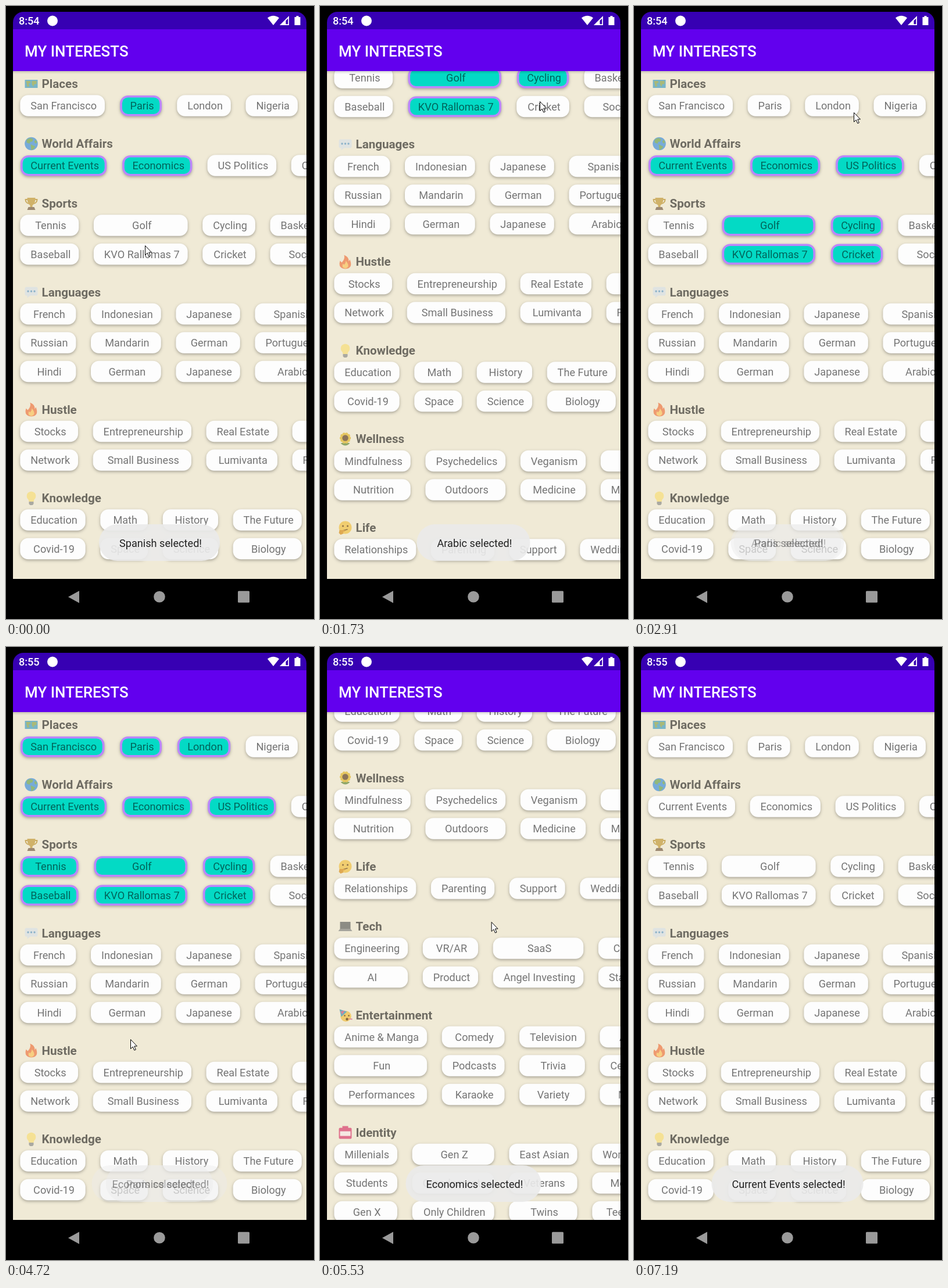
An HTML page with a canvas for the animation above (7590 ms loop, 530x1055 px).

```html
<!DOCTYPE html>
<html lang="en">
<head>
<meta charset="utf-8">
<title>My interests</title>
<style>
  html, body { margin: 0; width: 100%; height: 100%; overflow: hidden; background: #000; }
  canvas { display: block; width: 530px; height: 1055px; }
</style>
</head>
<body>
<canvas></canvas>
<script>
const LOOP = 7590, W = 530, H = 1055;
const canvas = document.querySelector('canvas'), g = canvas.getContext('2d');
const dpr = window.devicePixelRatio || 1;
canvas.width = W * dpr;
canvas.height = H * dpr;
g.scale(dpr, dpr);

const CHIP_FONT = '400 18.15px Roboto, sans-serif';
const clamp = v => Math.max(0, Math.min(1, v));
const smooth = p => p * p * (3 - 2 * p);
const dot = (x, y, r) => `M${x - r} ${y}a${r} ${r} 0 1 0 ${2 * r} 0a${r} ${r} 0 1 0 ${-2 * r} 0z`;
const dots = (...points) => points.map(([x, y, r]) => dot(x, y, r)).join('');
const petals = dots(...Array.from({ length: 10 }, (_, i) =>
  [7 * Math.cos(i * Math.PI / 5), 7 * Math.sin(i * Math.PI / 5) - 2, 2.6]));

// Icons are layers of [colour, path] around the origin.
const icons = {
  map: [['#79b5c8', 'M-11-7H11V7H-11z'], ['#a9b978', 'M-9-5h7l1 3-4 2 2 4-4 1-1-6zM1-5h8v5l-4 1-1 4-3-4z']],
  globe: [['#77abd8', dot(0, 0, 11.3)], ['#93b878', 'M-8-7l6-3 5 2-1 4-4 1-1 3-5-2zM-1 1l8 4-4 5-3 1zM7-7l3 4-2 3-3-3z']],
  trophy: [['#c9aa5e', 'M-11-8H11Q11 0 4 1H-4Q-11 0-11-8z'], ['#f0ead6', 'M-9-6H9Q8-1 4-1H-4Q-8-1-9-6z'],
    ['#d0b269', 'M-7-10H7Q7 1 2 3V6H-2V3Q-7 1-7-10z'], ['#9c8972', 'M-5 6H5l2 5H-7z']],
  speech: [['#dfe3e2', 'M-8-9H8q3 0 3 3V3q0 3-3 3H-2L-7 10V6h-1q-3 0-3-3V-6q0-3 3-3z'],
    ['#8cb2c9', dots([-5.5, -1.5, 1.7], [0, -1.5, 1.7], [5.5, -1.5, 1.7])]],
  fire: [['#ee9a70', 'M-2-12Q7-8 6-1L8-4Q14 11 0 12-13 11-9-2L-6 1Q0-5-2-12z'],
    ['#f7cf82', 'M1-2Q6 4 5 8 2 12-1 11-7 9-4 3L-2 5Q1 2 1-2z']],
  bulb: [['#f5e194', 'M-4 6Q-4 3-7 0-9-5-6-9 0-14 6-9 9-5 7 0 4 3 4 6z'], ['#aaa9a1', 'M-4 6H4V10L2 12H-2L-4 10z']],
  flower: [['#8fa76a', 'M-8 7Q0 4 8 7 0 15-8 7z'], ['#e5c660', petals], ['#8c7458', dot(0, -2, 5.2)]],
  think: [['#f0cd70', dot(0, -.5, 11)], ['#8d7048', dots([-4, -3, 1.5], [4, -3, 1.5]) + 'M-4 4l8-2v1.4l-8 2z'],
    ['#dfa953', 'M-10 4l9 0 1 2-4 1 1 3-5 2-3-3z']],
  laptop: [['#8c8c84', 'M-9-8H9V4H-9z'], ['#a5a49c', 'M-9 4H9L12 8H-12z']],
  party: [['#f0cb6d', dot(1, 2, 9.3)], ['#72aebd', 'M-10-10L3-6-7 3z'],
    ['#dc8195', 'M-8-6l7-2-4 7zM5 6h7v2l-7-1z'], ['#81643e', dots([-1, 1, 1.3], [6, 1, 1.3], [3, 7, 2.2])]],
  badge: [['#df718c', 'M-5-11H5V-8H9q2 0 2 2V9q0 2-2 2H-9q-2 0-2-2V-6q0-2 2-2h4z'], ['#f5e7e2', 'M-9-2H9V6H-9z']]
};

const categories = [
  ['map', 'Places', 'San Francisco,Paris,London,Nigeria'],
  ['globe', 'World Affairs', 'Current Events,Economics,US Politics,Current Affairs'],
  ['trophy', 'Sports', 'Tennis,Golf,Cycling,Basketball', 'Baseball,KVO Rallomas 7,Cricket,Soccer'],
  ['speech', 'Languages', 'French,Indonesian,Japanese,Spanish', 'Russian,Mandarin,German,Portuguese',
    'Hindi,German,Japanese,Arabic'],
  ['fire', 'Hustle', 'Stocks,Entrepreneurship,Real Estate,Sales', 'Network,Small Business,Lumivanta,Fundraising'],
  ['bulb', 'Knowledge', 'Education,Math,History,The Future', 'Covid-19,Space,Science,Biology'],
  ['flower', 'Wellness', 'Mindfulness,Psychedelics,Veganism,Yoga', 'Nutrition,Outdoors,Medicine,Meditation'],
  ['think', 'Life', 'Relationships,Parenting,Support,Weddings'],
  ['laptop', 'Tech', 'Engineering,VR/AR,SaaS,Crypto', 'AI,Product,Angel Investing,Startups'],
  ['party', 'Entertainment', 'Anime & Manga,Comedy,Television,Advice', 'Fun,Podcasts,Trivia,Celebrities',
    'Performances,Karaoke,Variety,Movies'],
  ['badge', 'Identity', 'Millenials,Gen Z,East Asian,Women', 'Students,Grandparents,Veterans,Men',
    'Gen X,Only Children,Twins,Teens']
];

// Each column is as wide as its longest label.
const headers = [], chips = [];
function layOut() {
  g.font = CHIP_FONT;
  let y = 134;
  for (const [icon, title, ...lines] of categories) {
    headers.push({ icon, title, y });
    const rows = lines.map(line => line.split(','));
    let x = 24.3;
    for (let c = 0; c < 4; c++) {
      const w = Math.max(...rows.map(row => g.measureText(row[c]).width)) + 32;
      rows.forEach((row, r) => chips.push({ label: row[c], x, w, y: y + 38 + r * 49.5 }));
      x += w + 25.5;
    }
    y += 53.5 + rows.length * 49.5;
  }
}
layOut();

// Rows scrolled far away lose their selection.
const PLACES_RESET = 1900, RESET = 5160;
const preselected = [[0, 'Paris', PLACES_RESET], [0, 'Current Events'], [0, 'Economics']];
const firstTaps = [[200, 'KVO Rallomas 7'], [430, 'Golf'], [750, 'Cycling']];
const secondTaps = [[2470, 'Cricket'], [2720, 'US Politics']];
const thirdTaps = [[3010, 'London'], [3330, 'Paris'], [3560, 'San Francisco'], [4050, 'Tennis'], [4230, 'Baseball']];
const taps = [...preselected, ...firstTaps, ...secondTaps, ...thirdTaps];
const isSelected = (label, t) =>
  taps.some(([from, name, until = RESET]) => name === label && from <= t && t < until);

const overChip = ([time, label]) => {
  const chip = chips.find(c => c.label === label);
  return [time, chip.x + chip.w / 2, chip.y];
};
const cursorStops = [
  [90, 239, 412], ...firstTaps.map(overChip),
  [1400, 378, 418], [1730, 378, 164], [2080, 378, 180], ...secondTaps.map(overChip),
  [2910, 378, 183], ...thirdTaps.map(overChip),
  [4700, 214, 675], [4740, 214, 675], [5080, 212, 134], [5160, 212, 134],
  [5780, 340, 659], [6100, 368, 1030], [6400, 372, 1040], [6990, 394, 1019], [7180, 455, 1062]
];
const scrollStops = [[1400, 0], [1730, 254], [1960, 420], [2080, 420], [2420, 0],
  [4740, 0], [5160, 658], [5450, 774], [5780, 774], [6100, 403], [6270, 0]];

// Eases from stop to stop; the first entry of each stop is its time.
function follow(stops, t) {
  const i = stops.findIndex(stop => stop[0] > t);
  const [t1, ...to] = stops.at(i), [t0, ...from] = stops[Math.max(0, i - 1)];
  if (i < 1) return to;
  const p = smooth((t - t0) / (t1 - t0));
  return from.map((v, k) => v + (to[k] - v) * p);
}

function text(str, x, y, font, color, align = 'left') {
  g.font = font;
  g.textAlign = align;
  g.fillStyle = color;
  g.fillText(str, x, y);
}

function fill(color, path) {
  g.fillStyle = color;
  g.fill(new Path2D(path));
}

function box(x, y, w, h, color, r = 0) {
  g.beginPath();
  g.roundRect(x, y, w, h, r);
  g.fillStyle = color;
  g.fill();
}

function drawChip({ label, x, y, w }, on) {
  g.save();
  g.shadowColor = 'rgba(0,0,0,.3)';
  g.shadowBlur = 5 * dpr;
  g.shadowOffsetY = 2 * dpr;
  if (on) box(x + .7, y - 18, w - 1.4, 35.5, '#bb86fc', 14);
  else box(x, y - 18.8, w, 36.6, '#fdfdfd', 14);
  g.restore();
  if (on) box(x + 4.3, y - 14.6, w - 8.6, 28.6, '#03dac5', 10);
  text(label, x + w / 2 + 2, y + 6.4, CHIP_FONT, 'rgba(0,0,0,.54)', 'center');
}

function drawList(t) {
  g.save();
  g.translate(0, -follow(scrollStops, t)[0]);
  for (const { icon, title, y } of headers) {
    g.save();
    g.translate(43.5, y);
    icons[icon].forEach(layer => fill(...layer));
    g.restore();
    text(title, 61.5, y + 7, '700 20.6px Roboto, sans-serif', 'rgba(0,0,0,.54)');
  }
  chips.forEach(chip => drawChip(chip, isSelected(chip.label, t)));
  g.restore();
}

const toasts = ['Spanish', 'Arabic', 'Paris', 'Economics', 'Current Events'];
function drawToasts(t) {
  const step = 1810, fade = 130;
  toasts.forEach((name, i) => {
    const end = 1105 + i * step;
    const fadeIn = i ? clamp((t - end + step) / fade + .5) : 1;
    const alpha = Math.min(fadeIn, clamp((end - t) / fade + .5));
    if (!alpha) return;
    const message = name + ' selected!';
    g.globalAlpha = alpha;
    g.font = CHIP_FONT;
    const w = g.measureText(message).width + 66;
    box(264 - w / 2, 892, w, 63, 'rgba(235,235,235,.91)', 31.5);
    text(message, 266, 930.5, CHIP_FONT, '#212121', 'center');
    g.globalAlpha = 1;
  });
}

function drawBars(t) {
  box(12, 10, 505, 30, '#3700b3', [18, 18, 0, 0]);
  box(12, 40, 505, 72, '#6200ee');
  const shade = g.createLinearGradient(0, 112, 0, 117);
  shade.addColorStop(0, 'rgba(0,0,0,.16)');
  shade.addColorStop(1, 'rgba(0,0,0,0)');
  box(12, 112, 505, 5, shade);
  text('MY INTERESTS', 32, 86.7, '500 26px Roboto, sans-serif', '#fff');
  text(t < 3500 ? '8:54' : '8:55', 22, 32, '500 18.1px Roboto, sans-serif', '#fff');
  fill('#fff', dot(80, 25.5, 9));
  fill('#fff', 'M450 20.5Q460 13 470 20.5L460 33z');
  fill('#fff', 'M487 17V33H471z');
  fill('#3700b3', 'M485.3 21.5V31.3H481.5V25.3z');
  fill('#fff', 'M499.5 17h4v2h3v14h-10V19h3z');
  fill('#9a9a9a', 'M107 1017L126 1006.5V1027.5z' + dot(264, 1016.7, 9.8));
  box(399, 1006.7, 20, 20, '#9a9a9a', 1.5);
}

function drawCursor(x, y) {
  g.save();
  g.translate(x, y);
  const arrow = new Path2D('M.5 .5V16.5L4.2 13 6.8 19 9.4 18 6.8 12H11.5z');
  g.fillStyle = '#fff';
  g.fill(arrow);
  g.strokeStyle = '#000';
  g.lineWidth = 1;
  g.stroke(arrow);
  g.restore();
}

function draw(t) {
  box(0, 0, W, H, '#000');
  g.save();
  g.beginPath();
  g.rect(12, 112, 505, 874);
  g.clip();
  box(12, 112, 505, 874, '#f0ead6');
  drawList(t);
  drawToasts(t);
  g.restore();
  drawBars(t);
  drawCursor(...follow(cursorStops, t));
}

const began = performance.now();
function frame() {
  draw((performance.now() - began) % LOOP);
  requestAnimationFrame(frame);
}
frame();
</script>
</body>
</html>
```
